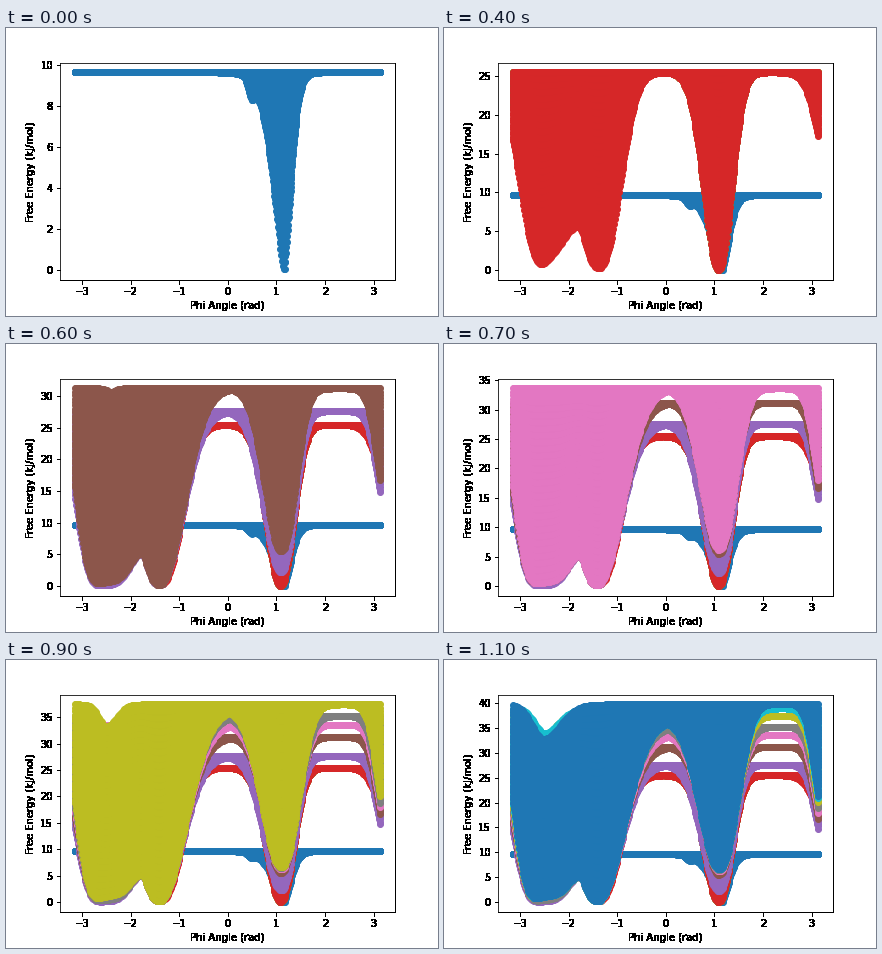
Animation, 432 px wide and 288 px high, one loop 1200 ms. Source, as a matplotlib script:

```python
import numpy as np
import matplotlib.pyplot as plt
from matplotlib.animation import FuncAnimation

plt.rcParams.update({
    "font.family": "DejaVu Sans", "font.size": 10,
    "figure.subplot.left": 0.125, "figure.subplot.right": 0.9,
    "figure.subplot.bottom": 0.125, "figure.subplot.top": 0.88,
})

PHI = np.radians(np.arange(-180, 180))
RAMP = np.linspace(0, 1, 30)[:, None]
DOME = 36.5  # energy of the barrier at phi = 0


def bump(center, left, right):
    d = PHI - center
    return np.exp(-(d / np.where(d < 0, left, right)) ** 2)


def well(a, b, floor, rim, left, right, p=2, q=2):
    """Periodic basin, flat from a to b, rising to rim on both sides."""
    d = (PHI - (a + b) / 2 + np.pi) % (2 * np.pi) - np.pi
    out = np.maximum(abs(d) - (b - a) / 2, 0)
    wall = np.where(d < 0, (out / left) ** p, (out / right) ** q)
    return rim - (rim - floor) * np.exp(-wall)


def lowest(*curves):
    return np.minimum.reduce(curves)


def terrain(level, floor, left, right, slope, lift):
    """Two joined basins on the left and a single well on the right."""
    rim = np.where((PHI > -2) & (PHI < 1.09), min(level, DOME), level)
    basin = well(-2.6, -1.42, .1, rim, .61, slope, 3.1, 2.1)
    basin += 5 * bump(-1.78, .33, .17) + lift * bump(-2.4, .4, .4)
    return lowest(basin, well(1.09, 1.09, floor, rim, left, right, 2, 2.3))


# First visits: one well, then the left side opens and fills up
start = (well(1.16, 1.16, 0, 9.64, .33, .2, 1.5, 1.6)
         - .8 * bump(.48, .08, .1))
R = 25.46
first_well = well(1.083, 1.083, 0, R, .42, .375, 2, 2.2)
shallow = lowest(
    well(-2.6, -2.15, 15.7, R, .27, .12),
    well(-2.1, -1.2, 19.3, R, .2, .2),
    well(-1.55, -1.25, 16.6, R, .12, .2, 2, 1.5),
    well(-1.39, -1.37, 14.6, R, .08, .08))
deep = well(-2.5, -1.4, .2, R, .63, .59, 2.5, 2.4) + 5.4 * bump(-1.8, .5, .2)

# (plateau, lowest energy, dip of the highest energy)
LAYERS = [
    (9.64, start, 0),
    (R, lowest(shallow, first_well), 0),
    (R, lowest((shallow + deep) / 2, first_well), 0),
    (R, lowest(deep, first_well), 0),
    (27.6, terrain(27.6, 2.2, .49, .39, .66, 0), 0),
    (31.2, terrain(31.2, 5.5, .46, .41, .69, .5), .6 * bump(-2.4, .12, .12)),
    (33.6, terrain(33.6, 6.2, .5, .45, .72, .5), 0),
    (35.2, terrain(35.2, 6.5, .52, .47, .73, .3), 3 * bump(-2.48, .2, .25)),
    (37.4, terrain(37.4, 6.6, .54, .48, .75, 1), 4.2 * bump(-2.5, .22, .3)),
    (38.9, terrain(38.9, 6.6, .54, .49, .75, 1), 5 * bump(-2.5, .28, .42)),
    (39.7, terrain(39.9, 6.6, .54, .5, .75, 1), 7 * bump(-2.52, .33, .5)),
]


def harden(img, dpi):
    """Make every touched pixel fully opaque."""
    img[..., 3] = img[..., 3] > 0
    return img, 0, 0


fig, ax = plt.subplots(figsize=(6, 4), dpi=72, facecolor="white")
ax.set_xlabel("Phi Angle (rad)")
ax.set_ylabel("Free Energy (kJ/mol)")
for part in (ax.xaxis, ax.yaxis, ax.spines["bottom"], ax.spines["right"]):
    part.set_agg_filter(harden)

clouds = []
for n, (level, low, dip) in enumerate(LAYERS):
    low = np.minimum(low, level)
    energy = low + (np.maximum(level - dip, low) - low) * RAMP
    phi = np.broadcast_to(PHI, energy.shape)
    clouds.append(ax.scatter(phi.ravel(), energy.ravel(), color=f"C{n % 10}"))


def update(i):
    last = max(i - 1, 0)
    for n, cloud in enumerate(clouds):
        cloud.set_visible(n <= last)
    top = LAYERS[last][0]
    ax.set_ylim(-.05 * top, 1.05 * top)
    return clouds


anim = FuncAnimation(fig, update, frames=12, interval=100,
                     repeat=True, repeat_delay=0, blit=False)
plt.show()
```
